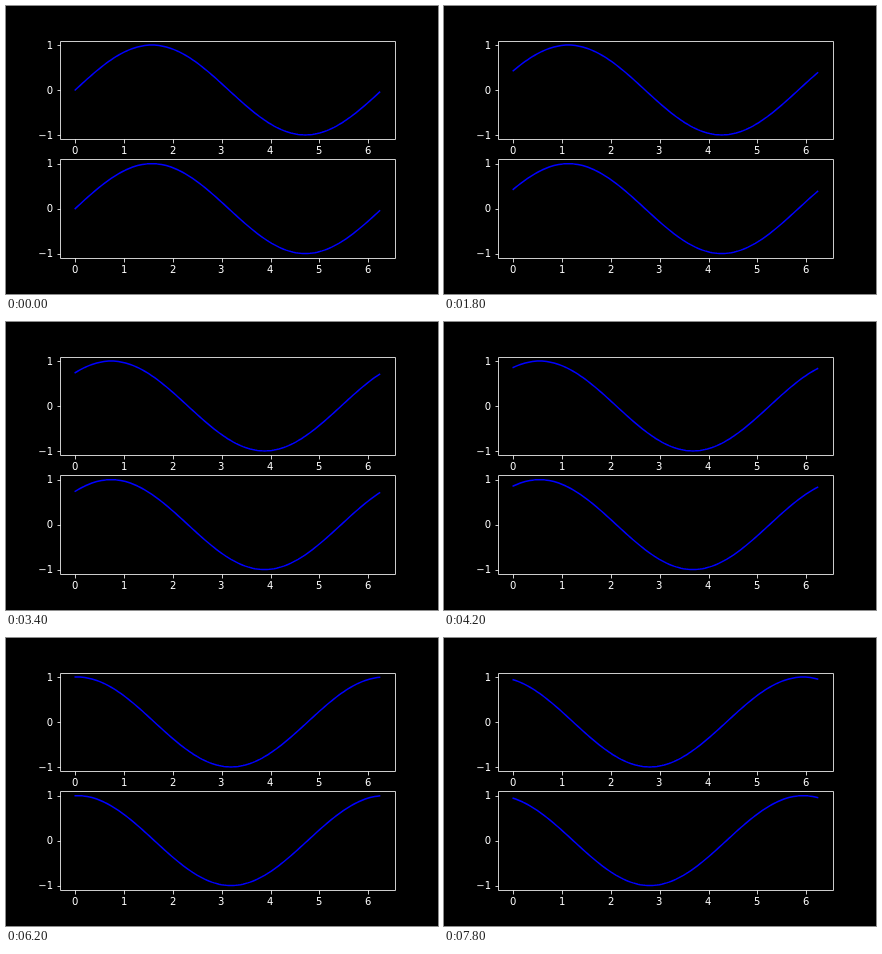
Recreate the animation shown at these times as an HTML page with a canvas. Size 432 px wide and 288 px high, loop 8 s.

```html
<!DOCTYPE html>
<html lang="en">
<head>
<meta charset="utf-8">
<title>Travelling sine waves</title>
<style>
  html, body { margin: 0; width: 100%; height: 100%; overflow: hidden; background: #000; }
  canvas { display: block; }
</style>
</head>
<body>
<canvas id="stage" width="432" height="288"></canvas>
<script>
const ctx = document.getElementById("stage").getContext("2d");
const LOOP = 8000, STEP = 200;
const SAMPLES = 128, DX = 2 * Math.PI / SAMPLES;
const LEFT = 54, WIDTH = 334.8, HEIGHT = 98.836;
const TOPS = [34.56, 153.164];
const X_SCALE = WIDTH / 1.1 / (DX * (SAMPLES - 1));
const Y_SCALE = HEIGHT / 2.2;

const toX = x => LEFT + WIDTH * 0.05 / 1.1 + x * X_SCALE;
const toY = (y, top) => top + HEIGHT / 2 - y * Y_SCALE;
const snap = v => Math.round(v) + 0.5;

function line(x1, y1, x2, y2) {
  ctx.beginPath();
  ctx.moveTo(x1, y1);
  ctx.lineTo(x2, y2);
  ctx.stroke();
}

function drawAxes(top) {
  const x0 = snap(LEFT), y0 = snap(top);
  const x1 = snap(LEFT + WIDTH), y1 = snap(top + HEIGHT);
  ctx.strokeStyle = ctx.fillStyle = "#fff";
  ctx.lineWidth = 0.8;
  ctx.lineCap = "butt";
  ctx.strokeRect(x0, y0, x1 - x0, y1 - y0);
  ctx.font = '10px "DejaVu Sans", sans-serif';

  ctx.textAlign = "left";
  for (let n = 0; n <= 6; n++) {
    const x = toX(n);
    line(snap(x), y1, snap(x), y1 + 4);
    ctx.fillText(n, Math.round(x - 3.2), Math.round(top + HEIGHT + 14.6));
  }
  ctx.textAlign = "right";
  for (let n = -1; n <= 1; n++) {
    const y = toY(n, top);
    line(x0 - 3, snap(y), x0, snap(y));
    ctx.fillText(String(n).replace("-", "\u2212"), 47, Math.round(y + 3.8));
  }
}

function drawWave(top, phase) {
  ctx.strokeStyle = "#00f";
  ctx.lineWidth = 1.5;
  ctx.lineCap = "square";
  ctx.lineJoin = "round";
  ctx.beginPath();
  for (let i = 0; i < SAMPLES; i++) {
    ctx.lineTo(toX(i * DX), toY(Math.sin(i * DX + phase), top));
  }
  ctx.stroke();
}

function draw(time) {
  const phase = Math.floor((time % LOOP) / STEP) * DX;
  ctx.fillStyle = "#000";
  ctx.fillRect(0, 0, 432, 288);
  for (const top of TOPS) {
    drawWave(top, phase);
    drawAxes(top);
  }
}

const start = performance.now();
function tick() {
  draw(performance.now() - start);
  requestAnimationFrame(tick);
}
tick();
</script>
</body>
</html>
```
